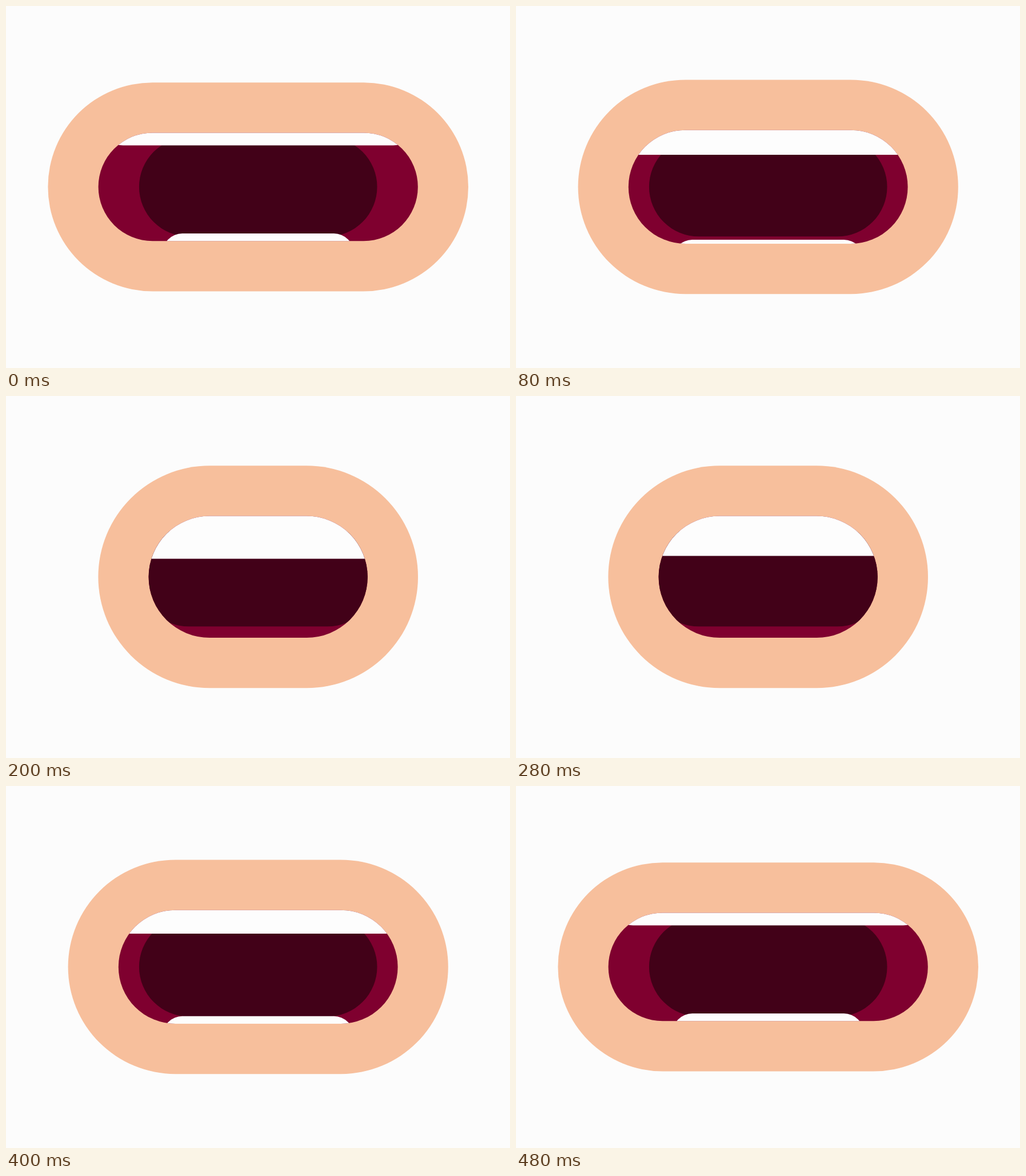
Write an HTML page with a canvas that moves like this. It is 882 by 635 pixels and loops after 0.52 s.

```html
<!DOCTYPE html>
<html lang="en">
<head>
<meta charset="utf-8">
<title>Talking mouth</title>
<style>
  html, body { margin: 0; width: 100%; height: 100%; overflow: hidden; background: #fcfcfc; }
  canvas { display: block; }
</style>
</head>
<body>
<canvas id="stage" width="882" height="635"></canvas>
<script>
const ctx = document.getElementById('stage').getContext('2d');
const STEP_MS = 40, STEPS = 13, HALF = 6;
const CX = 441.2, CY = 317.3, LIP = 88.2, TOOTH_RADIUS = 34.5;
const COLORS = { back: '#fcfcfc', lip: '#f7bf9c', cheek: '#7f002f', throat: '#420118', teeth: '#fdfdfd' };

const lerp = (a, b, t) => a + (b - a) * t;

function roundBox(left, top, right, bottom, radius) {
  ctx.beginPath();
  ctx.roundRect(left, top, right - left, bottom - top, radius);
}

function pill(halfWidth, halfHeight) {
  roundBox(CX - halfWidth, CY - halfHeight, CX + halfWidth, CY + halfHeight, halfHeight);
}

function fill(color) {
  ctx.fillStyle = color;
  ctx.fill();
}

const upperTeethEdge = step => 244.6 + Math.min(8.17 * step, 7.17 * (12 - step));

function lowerTeethEdge(step) {
  if (step <= HALF) return lerp(399.1, 431.8, step / HALF);
  if (step <= 10) return lerp(431.8, 403.8, (step - HALF) / 4);
  return lerp(403.8, 399.1, (step - 10) / 2);
}

function draw(step) {
  const squeeze = Math.min(step, 12 - step);
  const halfWidth = 367.8 - 17.6 * squeeze;
  const halfHeight = 183.1 + 2.37 * squeeze;

  ctx.fillStyle = COLORS.back;
  ctx.fillRect(0, 0, 882, 635);
  pill(halfWidth, halfHeight);
  fill(COLORS.lip);

  ctx.save();
  pill(halfWidth - LIP, halfHeight - LIP);
  fill(COLORS.cheek);
  ctx.clip();
  pill(208.3, 87);
  fill(COLORS.throat);
  roundBox(170.5, 100, 712, upperTeethEdge(step), TOOTH_RADIUS);
  fill(COLORS.teeth);
  roundBox(274, lowerTeethEdge(step), 608.4, 520, TOOTH_RADIUS);
  fill(COLORS.teeth);
  ctx.restore();
}

function tick() {
  draw(Math.floor(performance.now() / STEP_MS) % STEPS);
  requestAnimationFrame(tick);
}
tick();
</script>
</body>
</html>
```
